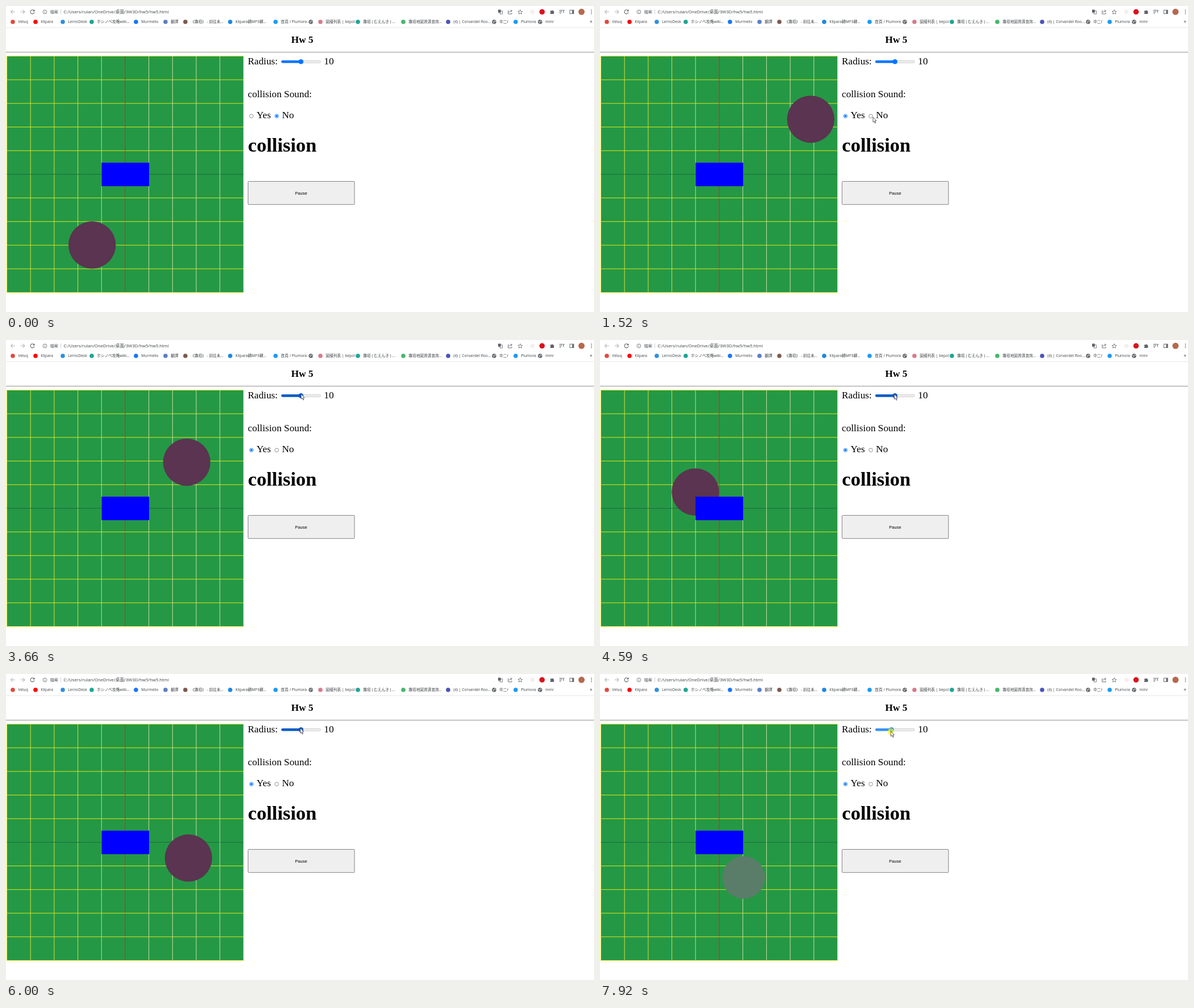
Write an HTML page that moves like this. It is 1036 px wide and 540 px high and loops after 7.99 s.

```html
<!DOCTYPE html>
<html lang="zh-Hant">
<head>
<meta charset="utf-8">
<title>Hw 5</title>
<style>
  html, body { margin: 0; width: 100%; height: 100%; overflow: hidden; background: #fff; }
  svg { display: block; }
  .ui { font-family: "Open Sans", "Noto Sans CJK TC", "Noto Sans CJK JP", "Noto Sans CJK", sans-serif; fill: #3c4043; }
  .page { font: 17.3px "Liberation Serif", serif; }
  .bold { font-weight: bold; }
  .line { fill: none; stroke: #5f6368; stroke-width: 1.1; }
  .radio { fill: #fff; stroke: #767676; stroke-width: .8; }
  .radio.on { stroke: #0075ff; }
  .dot { fill: #0075ff; }
</style>
</head>
<body>
<svg width="1036" height="540" viewBox="0 0 1036 540">
  <rect width="1036" height="540" fill="#fff"/>

  <!-- browser toolbar -->
  <g class="line">
    <path d="M16 10.300H8.500M12 6.800 8.500 10.300 12 13.800M25.500 10.300H33M29.500 6.800 33 10.300 29.500 13.800" stroke="#b4b6b9"/>
    <path d="M49.400 8.200A3.500 3.500 0 1 0 50 11.200M50 6.500V9H47.300"/>
    <circle cx="68.500" cy="10.400" r="3.400" stroke-width=".8"/>
    <path d="M68.500 9.800V12.300M68.500 8.300V9" stroke-width=".8"/>
    <path d="M96.500 6V14.500" stroke="#c4c7ca" stroke-width=".8"/>
    <rect x="867" y="6.500" width="4.800" height="5.200" fill="#5f6368" stroke="none"/>
    <rect x="870.200" y="8.800" width="4.300" height="5.200" stroke-width=".8"/>
    <path d="M886 8.500H884.800V14H891V11.800M886.500 11.500Q887 8.500 891 8.500M889.300 6.700 891.500 8.500 889.300 10.500" stroke-width=".9"/>
    <path d="M906 6.600 907.100 9.300 910 9.500 907.800 11.400 908.500 14.200 906 12.700 903.500 14.200 904.200 11.400 902 9.500 904.900 9.300Z" stroke-width=".8"/>
    <path d="M975 7.500H981M975 10H980M975 12.500H978M982.300 12V7.500H984" />
    <rect x="993.500" y="7.200" width="6.800" height="6.400" stroke-width=".9"/>
    <path d="M998.700 7.200V13.600" stroke-width="2.400"/>
  </g>
  <path d="M958.800 8.500H961A1.300 1.300 0 0 1 963.500 8.500H965.200V10.200A1.300 1.300 0 0 1 965.200 12.500V14H958.800V12.400A1.200 1.200 0 0 0 958.800 10.100Z" fill="#5f6368"/>
  <circle cx="927.500" cy="10.300" r="3.800" fill="#f7eeef"/>
  <circle cx="944.500" cy="10.300" r="4.800" fill="#d8141c"/>
  <circle cx="1014" cy="10.300" r="5.500" fill="#b5694d"/>
  <g fill="#5f6368"><circle cx="1031.500" cy="7.300" r=".9"/><circle cx="1031.500" cy="10.300" r=".9"/><circle cx="1031.500" cy="13.300" r=".9"/></g>
  <g class="ui" font-size="7.700">
    <text x="77.500" y="13" font-size="7.300" fill="#5f6368">檔案</text>
    <text x="101.500" y="13">C:/Users/rulan/OneDrive/桌面/3W3D/hw5/hw5.html</text>
  </g>
  <g id="marks" class="ui" font-size="6.700"></g>
  <path d="M0 38H1036" stroke="#e6e6e6"/>

  <!-- page -->
  <g class="page">
    <text class="bold" x="522" y="65.300" text-anchor="middle">Hw 5</text>
    <path d="M0 81.500H1036" stroke="#b0b0b0" stroke-width="1.300"/>
    <text x="426" y="103.300">Radius:</text>
    <text x="560.300" y="103.300">10</text>
    <text x="426" y="160.700">collision Sound:</text>
    <text x="441.500" y="198.200">Yes</text>
    <text x="486.300" y="198.200">No</text>
    <text class="bold" x="426.300" y="257.300" font-size="34.600">collision</text>
  </g>
  <rect x="426.500" y="309.500" width="187.500" height="40.800" rx="1" fill="#efefef" stroke="#767676" stroke-width=".9"/>
  <text x="520" y="332.600" text-anchor="middle" font-family="Liberation Sans, sans-serif" font-size="7.500">Pause</text>

  <circle id="yes" class="radio" cx="432.400" cy="194.300" r="3.300"/>
  <circle id="no" class="radio" cx="477" cy="194.300" r="3.300"/>
  <circle id="dot" class="dot" cy="194.300" r="2"/>

  <rect x="485.300" y="96.300" width="69" height="4" rx="2" fill="#efefef" stroke="#b2b2b2" stroke-width=".6"/>
  <rect id="fill" x="485" y="96" width="30" height="4.600" rx="2.300"/>
  <circle id="thumb" cy="98.300" r="4.300"/>

  <!-- playfield -->
  <rect x="1.500" y="88.500" width="417" height="417" fill="#259845"/>
  <g id="grid" fill="none"></g>
  <circle id="ball"/>
  <rect x="168.300" y="276.500" width="84" height="41.500" fill="#00f"/>

  <circle id="press" r="6" fill="#ff0" opacity=".6"/>
  <path id="cursor" d="M0 0V9L2 7.200 3.500 10.700 4.900 10.100 3.400 6.700H6Z" fill="#fff" stroke="#3a3346" stroke-width=".8"/>
</svg>
<script>
const $ = id => document.getElementById(id);
const add = (parent, tag, attrs, text) => {
  const el = document.createElementNS('http://www.w3.org/2000/svg', tag);
  set(el, attrs);
  if (text) el.textContent = text;
  parent.appendChild(el);
};
const set = (el, attrs) => { for (const k in attrs) el.setAttribute(k, attrs[k]); };

// Bookmarks: icon centre, colour (empty = globe), label
const marks = [
  [12, '#e04a3c', 'Veluq'], [52, '#f00', 'Klipara'], [100, '#2f8fe0', 'LernoDesk'],
  [151, '#1ea594', 'ホシノベ攻略wiki...'], [229, '#1877f2', 'Murmelio'], [281, '#5a7fc4', '翻譯'],
  [316, '#7b5a50', '《霧垣》 - 前往未...'], [395, '#1b87e5', 'Klipara轉MP3轉...'],
  [475, '#1d9bf0', '首頁 / Plumora'], [537, '', ''], [554, '#d77a8c', '圖譜列表 | bepo!'],
  [620, '#1ea594', '霧垣 ( むえんき ) ...'], [700, '#45b86b', '霧垣地圖資源查詢...'],
  [779, '#4b53bc', '(4) | Corvandel Roo...'], [860, '', '中二r'], [898, '#1d9bf0', 'Plumora'], [941, '', 'mmr']
];
for (const [x, color, label] of marks) {
  add($('marks'), 'circle', { cx: x, cy: 28, r: 3.8, fill: color || '#5f6368' });
  if (!color) add($('marks'), 'path', { d: `M${x - 2.5} 27l2 1-.5 2.500M${x + .5} 25.500l.5 1.500 2 .5`, stroke: '#fff', fill: 'none', 'stroke-width': .9 });
  add($('marks'), 'text', { x: x + 9.3, y: 30.4 }, label);
}
add($('marks'), 'text', { x: 1028.5, y: 30.4, 'font-size': 9 }, '»');

const cell = 41.7;
for (let i = 0; i <= 10; i++) {
  const x = 1.5 + i * cell, y = 88.5 + i * cell, edge = i % 10 === 0, axis = i === 5;
  add($('grid'), 'path', { d: `M${x} 88.500V505.500`, stroke: axis ? '#a8382a' : edge ? '#e6ee10' : i > 5 ? '#c3dfa0' : '#cfe040' });
  add($('grid'), 'path', { d: `M1.500 ${y}H418.500`, stroke: axis ? '#176b3c' : '#dbe71c' });
}

// Piecewise linear value of column c in rows [time, ...values]
const at = (keys, t, c = 1) => {
  const n = keys.findIndex(k => k[0] > t);
  if (n < 0) return keys[keys.length - 1][c];
  if (n === 0) return keys[0][c];
  const a = keys[n - 1], b = keys[n];
  return a[c] + (b[c] - a[c]) * (t - a[0]) / (b[0] - a[0]);
};

const LOOP = 7990;
// Wall hits of the ball on each axis
const ballX = [[0, 152], [378, 44], [1541, 377], [2705, 44], [3865, 377], [5022, 44], [6197, 377], [7275, 66], [LOOP, 273]];
const ballY = [[0, 422], [1232, 131], [2630, 464], [4013, 131], [5416, 464], [6905, 109.6], [LOOP, 376]];
const radius = [[6350, 10], [6550, 5], [7040, 5], [7130, 7], [7260, 15], [7580, 15], [7900, 9]];
const pointer = [
  [200, 980, 502], [500, 640, 300], [760, 433, 194], [1200, 433, 194], [1500, 481, 196], [1530, 481, 196],
  [1700, 540, 200], [2000, 541, 199], [2350, 524, 96], [2600, 521, 95], [3500, 521, 95], [3900, 518.5, 95.500],
  [6320, 518.5, 95.500], [6520, 486, 98], [6980, 486, 98], [7130, 510.5, 99], [7260, 572, 98], [7380, 582, 98],
  [7540, 576, 98], [7900, 512.5, 101]
];

function draw(now) {
  const t = now % LOOP;
  const r = Math.round(at(radius, t));
  set($('ball'), { cx: at(ballX, t), cy: at(ballY, t), r: r * cell / 10, fill: t < 7450 ? '#5a3450' : '#5a7d6a' });

  const sound = t >= 830, drag = t >= 6320, hover = t >= 2330;
  $('yes').classList.toggle('on', sound);
  $('no').classList.toggle('on', !sound);
  set($('dot'), { cx: sound ? 432.4 : 477 });

  const thumb = 519.7 + (r - 10) * 6.1;
  const blue = drag ? '#3793f5' : hover ? '#005cc8' : '#0075ff';
  set($('fill'), { width: thumb - 485, fill: blue });
  set($('thumb'), { cx: thumb, fill: blue });

  const x = at(pointer, t), y = at(pointer, t, 2);
  set($('cursor'), { transform: `translate(${x} ${y})`, visibility: t < 200 ? 'hidden' : 'visible' });
  set($('press'), { cx: x, cy: y + 1, visibility: drag || t > 800 && t < 890 ? 'visible' : 'hidden' });
}

const start = performance.now();
const tick = () => { draw(performance.now() - start); requestAnimationFrame(tick); };
tick();
</script>
</body>
</html>
```
